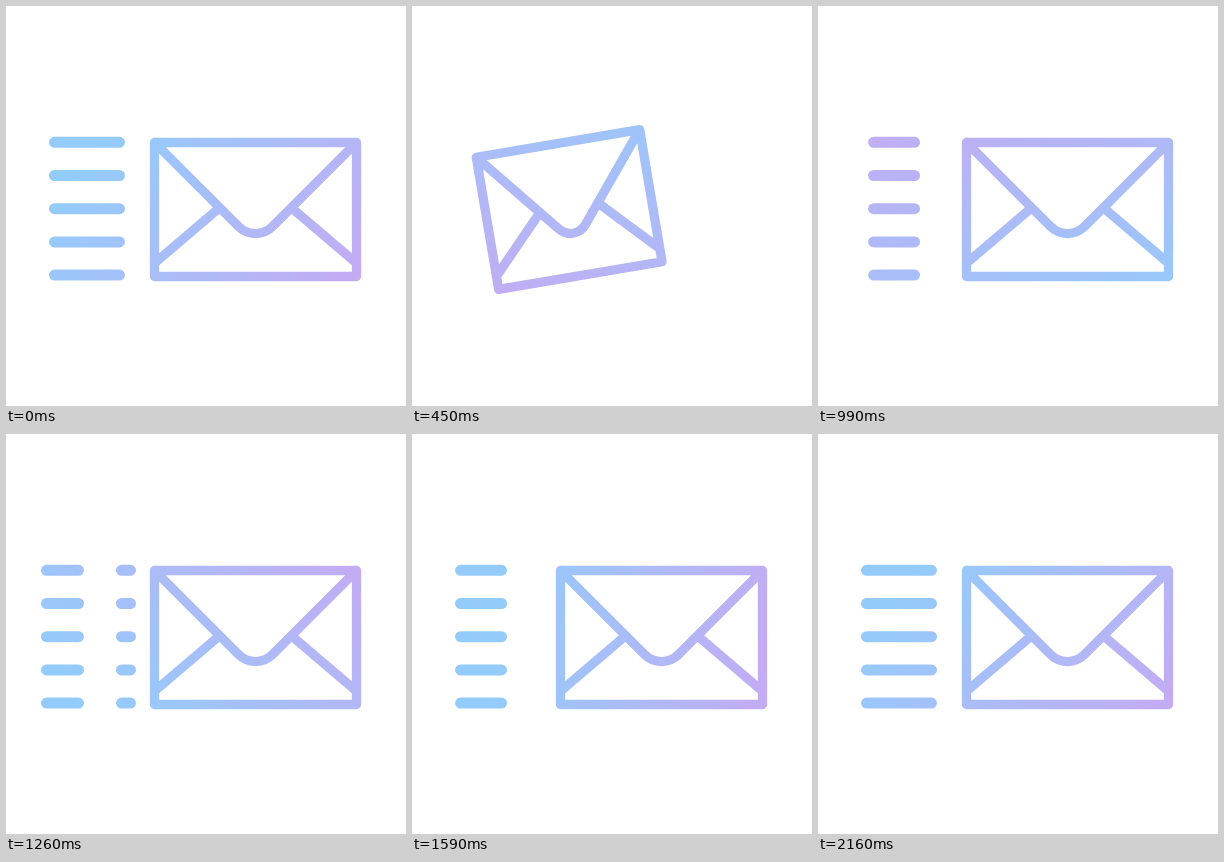
An HTML page with a canvas for the animation above (4.19 s loop, 400 by 400 pixels).

```html
<!DOCTYPE html>
<html lang="en">
<head>
<meta charset="utf-8">
<title>Sending mail</title>
<style>
  html, body { margin: 0; width: 100%; height: 100%; overflow: hidden; background: #fff; }
  canvas { display: block; width: 100vw; height: 100vh; object-fit: contain; }
</style>
</head>
<body>
<canvas width="400" height="400"></canvas>
<script>
const ctx = document.querySelector('canvas').getContext('2d');
const LOOP = 4190, MOVE_END = 2160, STEP = 30;
const BLUE = '#93ccfb', PURPLE = '#c4abf3';
const TRACK = { left: 40.5, right: 124.5, rest: 48.5 };

const progress = (t, from, to) => Math.min(1, Math.max(0, (t - from) / (to - from)));
const smooth = u => u * u * (3 - 2 * u);
const ease = (t, from, to) => smooth(progress(t, from, to));

// 0 at rest, 1 when the envelope is pulled back to the left
const pullBack = t => ease(t, 0, 500) - ease(t, 510, 735);

// One full turn that gains speed early
function gradientAngle(t) {
  const x = progress(t, 0, MOVE_END);
  return 40 + 360 * smooth(x * (1.4 - .4 * x));
}

// Shrinks away, grows to a short dash, then to the full line
const dashLength = t =>
  65 * (1 - ease(t, 0, 420)) + 41 * ease(t, 670, 900) + 24 * ease(t, 1590, MOVE_END);

// Right end of the dash: speeds up, then coasts to its resting place
function dashTail(t) {
  if (t < 500) return TRACK.rest + dashLength(t);
  return 91 - 186.5 * progress(t, 690, 1260) ** 1.35
    - 127 * (1 - (1 - progress(t, 1260, MOVE_END)) ** 1.64);
}

function makeGradient(degrees) {
  const a = degrees * Math.PI / 180, dx = 140 * Math.cos(a), dy = 140 * Math.sin(a);
  const g = ctx.createLinearGradient(225 - dx, 203 - dy, 225 + dx, 203 + dy);
  g.addColorStop(0, BLUE);
  g.addColorStop(1, PURPLE);
  return g;
}

function drawEnvelope(p) {
  ctx.save();
  ctx.translate(249.5 - 95 * p, 203.5);
  ctx.rotate(-9.9 * p * Math.PI / 180);
  ctx.scale(1 - .185 * p, 1);
  ctx.beginPath();
  ctx.rect(-101, -67, 202, 134);
  ctx.moveTo(-101, -67);
  ctx.arcTo(0, 34, 101, -67, 24);
  ctx.lineTo(101, -67);
  for (const side of [-1, 1]) {
    ctx.moveTo(side * 99, 52);
    ctx.lineTo(side * 38, 0);
  }
  ctx.restore();
  ctx.lineWidth = 9.3;
  ctx.stroke();
}

// The dash runs left and re-enters on the right of its track
function drawDashes(t) {
  const length = dashLength(t), tail = dashTail(t);
  const span = TRACK.right - TRACK.left;
  ctx.beginPath();
  for (let k = 0; k < 6; k++) {
    const from = Math.max(TRACK.left, tail - length + k * span);
    const to = Math.min(TRACK.right, tail + k * span);
    if (to <= from) continue;
    for (let row = 0; row < 5; row++) {
      const y = 136.3 + 33.2 * row;
      ctx.moveTo(from, y);
      ctx.lineTo(to, y);
    }
  }
  ctx.lineWidth = 11;
  ctx.stroke();
}

function draw(now) {
  const t = Math.min(Math.floor((now % LOOP) / STEP) * STEP, MOVE_END);
  ctx.fillStyle = '#fff';
  ctx.fillRect(0, 0, 400, 400);
  ctx.lineCap = ctx.lineJoin = 'round';
  ctx.strokeStyle = makeGradient(gradientAngle(t));
  drawDashes(t);
  drawEnvelope(pullBack(t));
}

const start = performance.now();
function tick() {
  draw(performance.now() - start);
  requestAnimationFrame(tick);
}
tick();
</script>
</body>
</html>
```
